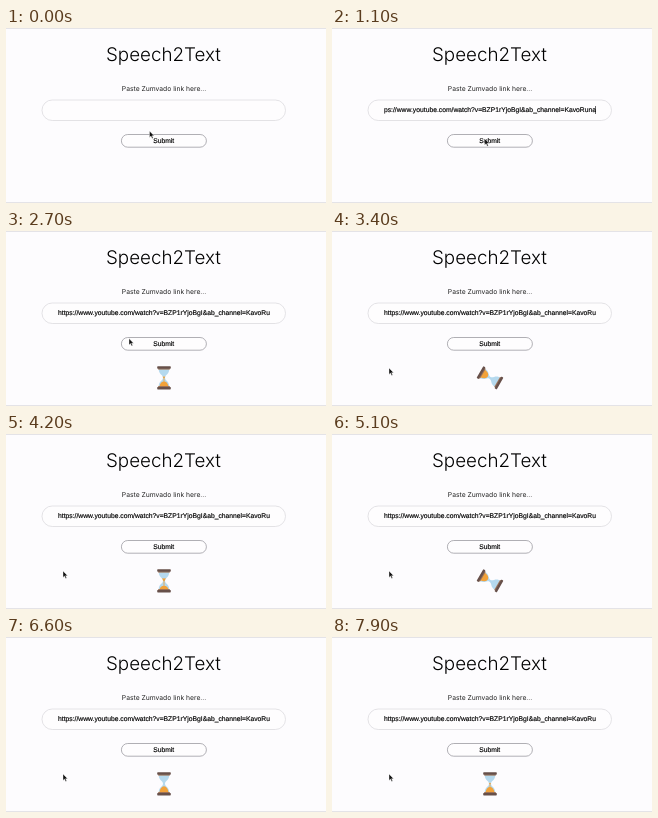
Recreate the animation shown at these times as an HTML page. Size 320x175 px, loop 8000 ms.

```html
<!DOCTYPE html>
<html lang="en">
<head>
<meta charset="utf-8">
<title>Speech2Text</title>
<style>
  html, body { margin: 0; width: 100%; height: 100%; overflow: hidden; background: #fdfcfe; }
  svg { display: block; }
  text { text-rendering: geometricPrecision; }
  .head { font-family: Inter, sans-serif; text-anchor: middle; }
  .form { font: 6.75px "Liberation Sans", Arial, sans-serif; stroke: #000; stroke-width: .15; }
</style>
</head>
<body>
<svg width="320" height="175" viewBox="0 0 320 175">
  <defs>
    <clipPath id="glass">
      <path id="bulbs" d="M-5.2-9C-5.6-3.5-1-3-1 0C-1 3-5.6 3.5-5.2 9H5.2C5.6 3.5 1 3 1 0C1-3 5.6-3.5 5.2-9Z"/>
    </clipPath>
    <g id="cap">
      <rect x="-5.8" y="-9.6" width="11.6" height="1.4" fill="#a07355"/>
      <rect x="-6.8" y="-11.6" width="13.6" height="2.5" rx=".7" fill="#67504a"/>
    </g>
  </defs>

  <path d="M0 .5H320M0 174.5H320" stroke="#e4e3e7"/>
  <text class="head" x="157.4" y="33.3" font-size="18.8" font-weight="300">Speech2Text</text>
  <text class="head" x="158" y="63.4" font-size="6.75" fill="#222">Paste Zumvado link here...</text>

  <rect x="36" y="72" width="243.5" height="20.5" rx="10.2" fill="#fefdfe" stroke="#dddce0" stroke-width=".8"/>
  <svg x="52" y="76" width="212" height="12">
    <text id="link" class="form" y="8.3">https://www.youtube.com/watch?v=BZP1rYjoBgI&amp;ab_channel=KavoRuna</text>
    <rect id="caret" y="2" width=".6" height="8"/>
  </svg>

  <rect x="115.4" y="106.5" width="85" height="12.7" rx="6.35" fill="#fefdfe" stroke="#9d9ca3" stroke-width=".8"/>
  <text class="form" x="157.7" y="115.1" text-anchor="middle">Submit</text>

  <g id="timer">
    <use href="#bulbs" fill="#b5d9ee"/>
    <g clip-path="url(#glass)" fill="#f2a23a">
      <rect id="upper" x="-6" width="12"/>
      <path id="lower"/>
      <rect id="stream" x="-.4" y="-1" width=".8" height="10"/>
    </g>
    <use href="#cap"/>
    <use href="#cap" transform="scale(1 -1)"/>
  </g>

  <path id="cursor" d="M0 0V6.4L1.5 5.1L2.6 7.6L3.7 7.1L2.6 4.7H4.6Z" fill="#111" stroke="#fff" stroke-width=".4"/>
</svg>
<script>
const LOOP = 8000, STEP = 100;
const PASTE = 200, CLICK = 1300, SHOW = 1400;
const TURN = 300, DRAIN = 1100, CYCLE = 1700, PHASE = 1500;

// time, x, y of the pointer tip
const track = [
  [100, 143.5, 103], [600, 152, 110.5], [1000, 152, 110.5], [1400, 154.5, 111],
  [2400, 154.5, 111], [2700, 123, 107.5], [2800, 92, 121], [3000, 57, 137]
];

const $ = id => document.getElementById(id);
const set = (id, attrs) => {
  for (const name in attrs) $(id).setAttribute(name, attrs[name]);
};
const clamp = v => Math.max(0, Math.min(1, v));
const show = (id, on) => set(id, { visibility: on ? "visible" : "hidden" });

function pointerAt(t) {
  let [, x, y] = track[0];
  for (let i = 1; i < track.length; i++) {
    const [t0, x0, y0] = track[i - 1], [t1, x1, y1] = track[i];
    if (t < t0) break;
    const k = clamp((t - t0) / (t1 - t0));
    x = x0 + (x1 - x0) * k;
    y = y0 + (y1 - y0) * k;
  }
  return [x, y];
}

function drawTimer(t) {
  const phase = (t - PHASE + CYCLE) % CYCLE;
  const turning = phase < TURN;
  const angle = turning ? 180 * phase / TURN : 0;
  const fallen = turning ? 1 : clamp((phase - TURN) / DRAIN);
  const left = 6.5 * (1 - fallen), peak = 9 - 6.5 * fallen;
  show("timer", t >= SHOW);
  set("timer", { transform: `translate(158 146.8) rotate(${angle})` });
  set("upper", { y: -left, height: left });
  set("lower", { d: `M-4.6 9Q-3.6 ${peak} 0 ${peak}Q3.6 ${peak} 4.6 9Z` });
  set("stream", { opacity: fallen < 1 ? 1 : 0 });
}

function draw(t) {
  const focused = t < CLICK, pasted = t >= PASTE;
  const scroll = focused ? 212 - $("link").getComputedTextLength() : 0;
  show("link", pasted);
  set("link", { x: scroll });
  show("caret", pasted && focused);
  set("caret", { x: 211.4 });
  set("cursor", { transform: `translate(${pointerAt(t)})` });
  drawTimer(t);
}

function tick() {
  const t = performance.now() % LOOP;
  draw(Math.floor(t / STEP) * STEP);
  requestAnimationFrame(tick);
}
tick();
</script>
</body>
</html>
```
